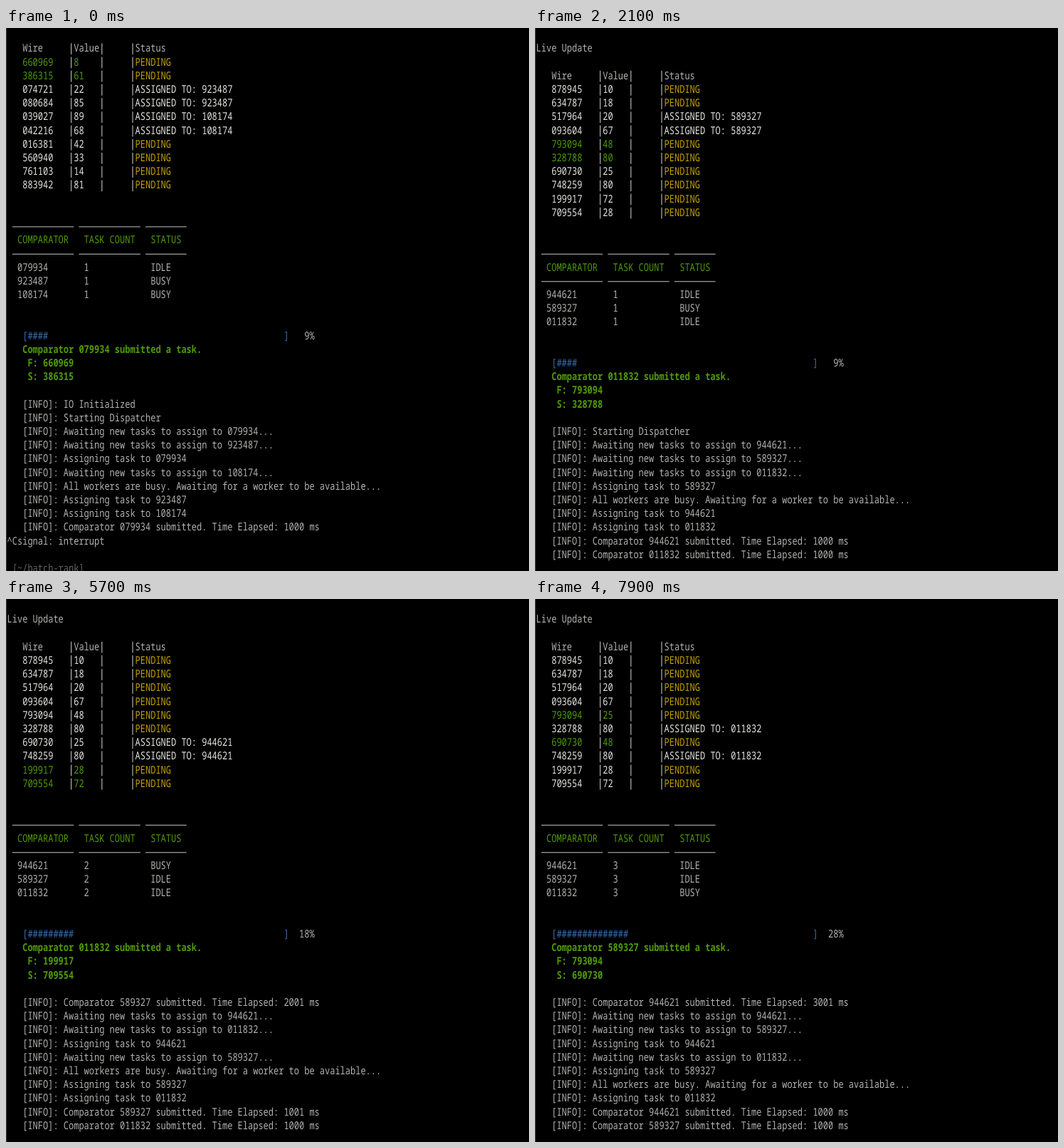
Write an HTML page that moves like this. It is 735 px wide and 762 px high and loops after 8 s.

```html
<!DOCTYPE html>
<html lang="en">
<head>
<meta charset="utf-8">
<title>Terminal session</title>
<style>
  html, body { margin: 0; width: 100%; height: 100%; overflow: hidden; background: #000; }
  svg { display: block; width: 100vw; height: 100vh; }
  text {
    font: 15px "Noto Sans Mono", "DejaVu Sans Mono", monospace;
    white-space: pre;
    text-rendering: geometricPrecision;
    font-variant-ligatures: none;
  }
  .bold { font-weight: 700; }
</style>
</head>
<body>
<svg viewBox="0 0 735 762" xmlns="http://www.w3.org/2000/svg">
  <rect width="735" height="762" fill="#000"/>
  <rect width="1" height="762" fill="#3a3a3a"/>
  <g id="shapes"></g>
  <g id="glyphs" transform="translate(1.6 0) scale(.8 1)"></g>
  <rect id="cursor" x="1.6" y="748.8" width="7.2" height="19.2" fill="#aaa"/>
</svg>
<script>
const LOOP = 8000;
const CELL = 7.2, LINE = 19.2, LEFT = 1.6, BASE = 14.2, ADVANCE = 9;
const GREY = '#b2b2b0', WHITE = '#e4e4de', GREEN = '#4e9a06', GOLD = '#c4a000',
      BLUE = '#3b70b4', DIM = '#626262';

const shapes = document.getElementById('shapes');
const glyphs = document.getElementById('glyphs');
const cursor = document.getElementById('cursor');

const colX = col => LEFT + col * CELL;

function add(parent, tag, attrs) {
  const node = document.createElementNS('http://www.w3.org/2000/svg', tag);
  for (const key in attrs) node.setAttribute(key, attrs[key]);
  return parent.appendChild(node);
}

function put(row, col, str, fill = GREY, bold = false) {
  if (row < 0 || row > 39) return;
  const attrs = { x: col * ADVANCE, y: row * LINE + BASE, fill };
  if (bold) attrs.class = 'bold';
  add(glyphs, 'text', attrs).textContent = str;
}

function rule(row, col, cells) {
  add(shapes, 'rect', {
    x: colX(col), y: (row + .5) * LINE, width: cells * CELL, height: 1.1, fill: GREY
  });
}

function bar(row, col) {
  add(shapes, 'rect', {
    x: colX(col + .5) - .6, y: row * LINE + 2.2, width: 1.2, height: 15.8, fill: GREY
  });
}

// Log shorthand: w = awaiting, a = assigning, b = busy, s = submitted.
function logLines(script, workers) {
  return script.split(' ').map(word => {
    const id = workers[word[1]];
    switch (word[0]) {
      case 'i': return 'Initializing IO';
      case 'o': return 'IO Initialized';
      case 'd': return 'Starting Dispatcher';
      case 'w': return `Awaiting new tasks to assign to ${id}...`;
      case 'a': return `Assigning task to ${id}`;
      case 'b': return 'All workers are busy. Awaiting for a worker to be available...';
      default: return `Comparator ${id} submitted. Time Elapsed: ${word.slice(3)} ms`;
    }
  });
}

function session(ids, wires, values, script) {
  const workers = ids.split(' ');
  return { workers, wires: wires.split(' '), values, log: logLines(script, workers) };
}

const earlier = session(
  '079934 923487 108174',
  '660969 386315 074721 080684 039027 042216 016381 560940 761103 883942',
  [8, 61, 22, 85, 89, 68, 42, 33, 14, 81],
  'o d w0 w1 a0 w2 b a1 a2 s0:1000');

const live = session(
  '944621 589327 011832',
  '878945 634787 517964 093604 793094 328788 690730 748259 199917 709554',
  [10, 18, 20, 67, 80, 48, 25, 80, 72, 28],
  'i o d w0 w1 w2 a1 b a0 a2 s0:1000 s2:1000 s1:2001 w0 w2 a0 w1 b a1 a2 ' +
  's1:1001 s2:1000 s0:3001 w0 w1 a0 w2 a1 b a2 s0:1000 s1:1000');

// "tasks" gives each wire's worker; "hot" holds the two wires just submitted by "by".
const ended = { on: earlier, tasks: '--1122----', round: 1, logged: 10, by: 0, hot: [0, 1] };
const steps = [
  { at: 0, ...ended, scroll: 2 },
  { at: 400, ...ended, scroll: 3 },
  { at: 700, ...ended, scroll: 4 },
  { at: 800, ...ended, scroll: 5 },
  { at: 900, tasks: '001122----', round: 1, logged: 10 },
  { at: 1800, tasks: '--11------', round: 1, logged: 12, by: 2, hot: [4, 5], swap: true },
  { at: 3600, tasks: '1-1---0022', round: 2, logged: 20 },
  { at: 3800, tasks: '------0022', round: 2, logged: 21, by: 1, hot: [0, 2] },
  { at: 3900, tasks: '------00--', round: 2, logged: 22, by: 2, hot: [8, 9], swap: true },
  { at: 5900, tasks: '----------', round: 2, logged: 23, by: 0, hot: [6, 7] },
  { at: 6800, tasks: '-0-01212--', round: 3, logged: 30 },
  { at: 7800, tasks: '----1212--', round: 3, logged: 31, by: 0, hot: [1, 3] },
  { at: 7900, tasks: '-----2-2--', round: 3, logged: 32, by: 1, hot: [4, 6], swap: true }
];

let current = live.values;
for (const step of steps) {
  step.on = step.on || live;
  if (step.swap) {
    const [a, b] = step.hot;
    current = current.slice();
    [current[a], current[b]] = [current[b], current[a]];
  }
  step.values = step.on === live ? current : step.on.values;
}

const cursorOn = [[1500, 2100], [3800, 4400], [5000, 5700], [6300, 6800], [7400, 7800]];

function drawWires(step, top) {
  const { wires, workers } = step.on;
  const bars = row => [12, 18, 24].forEach(col => bar(row, col));
  put(top, 3, 'Wire');
  put(top, 13, 'Value');
  put(top, 25, 'Status');
  bars(top);
  wires.forEach((wire, i) => {
    const row = top + 1 + i;
    const fill = step.hot && step.hot.includes(i) ? GREEN : WHITE;
    const owner = workers[step.tasks[i]];
    put(row, 3, wire, fill);
    put(row, 13, String(step.values[i]), fill);
    put(row, 25, owner ? `ASSIGNED TO: ${owner}` : 'PENDING', owner ? WHITE : GOLD);
    bars(row);
  });
}

function drawWorkers(step, top) {
  for (const row of [top, top + 2]) {
    rule(row, 1, 12);
    rule(row, 14, 12);
    rule(row, 27, 8);
  }
  put(top + 1, 2, 'COMPARATOR', GREEN);
  put(top + 1, 15, 'TASK COUNT', GREEN);
  put(top + 1, 28, 'STATUS', GREEN);
  step.on.workers.forEach((id, i) => {
    const row = top + 3 + i;
    put(row, 2, id);
    put(row, 15, String(step.round));
    put(row, 28, step.tasks.includes(i) ? 'BUSY' : 'IDLE');
  });
}

function drawProgress(step, row) {
  const percent = [0, 9, 18, 28][step.round];
  put(row, 3, '[' + '#'.repeat(percent >> 1), BLUE);
  put(row, 54, ']', BLUE);
  put(row, 57, String(percent).padStart(2) + '%');
  if (!step.hot) return;
  const [first, second] = step.hot.map(i => step.on.wires[i]);
  put(row + 1, 3, `Comparator ${step.on.workers[step.by]} submitted a task.`, GREEN, true);
  put(row + 2, 4, `F: ${first}`, GREEN, true);
  put(row + 3, 4, `S: ${second}`, GREEN, true);
}

function segment(row, from, to, fill) {
  const y = row * LINE, x = colX(to);
  add(shapes, 'path', {
    d: `M${colX(from)} ${y}H${x}l${CELL} ${LINE / 2}L${x} ${y + LINE}H${colX(from)}z`, fill
  });
}

function drawPrompt(row) {
  put(row, 1, '[~/batch-rank]', DIM);
  const line = row + 1, y = line * LINE;
  if (line > 39) return;
  segment(line, 4, 29, GOLD);
  segment(line, 3, 18, '#555753');
  segment(line, 0, 3, '#2a2a2a');
  const stroke = { fill: 'none', 'stroke-width': 1.4 };
  add(shapes, 'path', { d: `M9.6 ${y + 5}l6 9m0 -9l-6 9`, stroke: '#d0640c', ...stroke });
  add(shapes, 'path', {
    d: `M147.5 ${y + 3}v13m0 -3q5 -1 5 -6v-2`, stroke: '#1a1a1a', ...stroke
  });
  put(line, 5, 'lanternwharf', '#68b41a', true);
  put(line, 22, 'main ~', '#1a1a1a');
  put(line, 31, 'go', GREEN);
  put(line, 34, 'run example/main.go\\');
}

function draw(step) {
  shapes.replaceChildren();
  glyphs.replaceChildren();
  const shift = -(step.scroll || 0);
  put(1 + shift, 0, 'Live Update');
  drawWires(step, 3 + shift);
  drawWorkers(step, 16 + shift);
  drawProgress(step, 24 + shift);
  step.on.log.slice(step.logged - 10, step.logged)
    .forEach((line, i) => put(29 + shift + i, 3, `[INFO]: ${line}`));
  if (step.on === earlier) {
    put(39 + shift, 0, '^Csignal: interrupt');
    drawPrompt(41 + shift);
  }
}

let shown = null;
function render(time) {
  const t = time % LOOP;
  const step = steps.filter(s => s.at <= t).pop();
  if (step !== shown) draw(shown = step);
  const lit = cursorOn.some(([from, to]) => t >= from && t < to);
  cursor.setAttribute('visibility', lit ? 'visible' : 'hidden');
}

function tick() {
  render(performance.now());
  requestAnimationFrame(tick);
}
tick();
</script>
</body>
</html>
```
